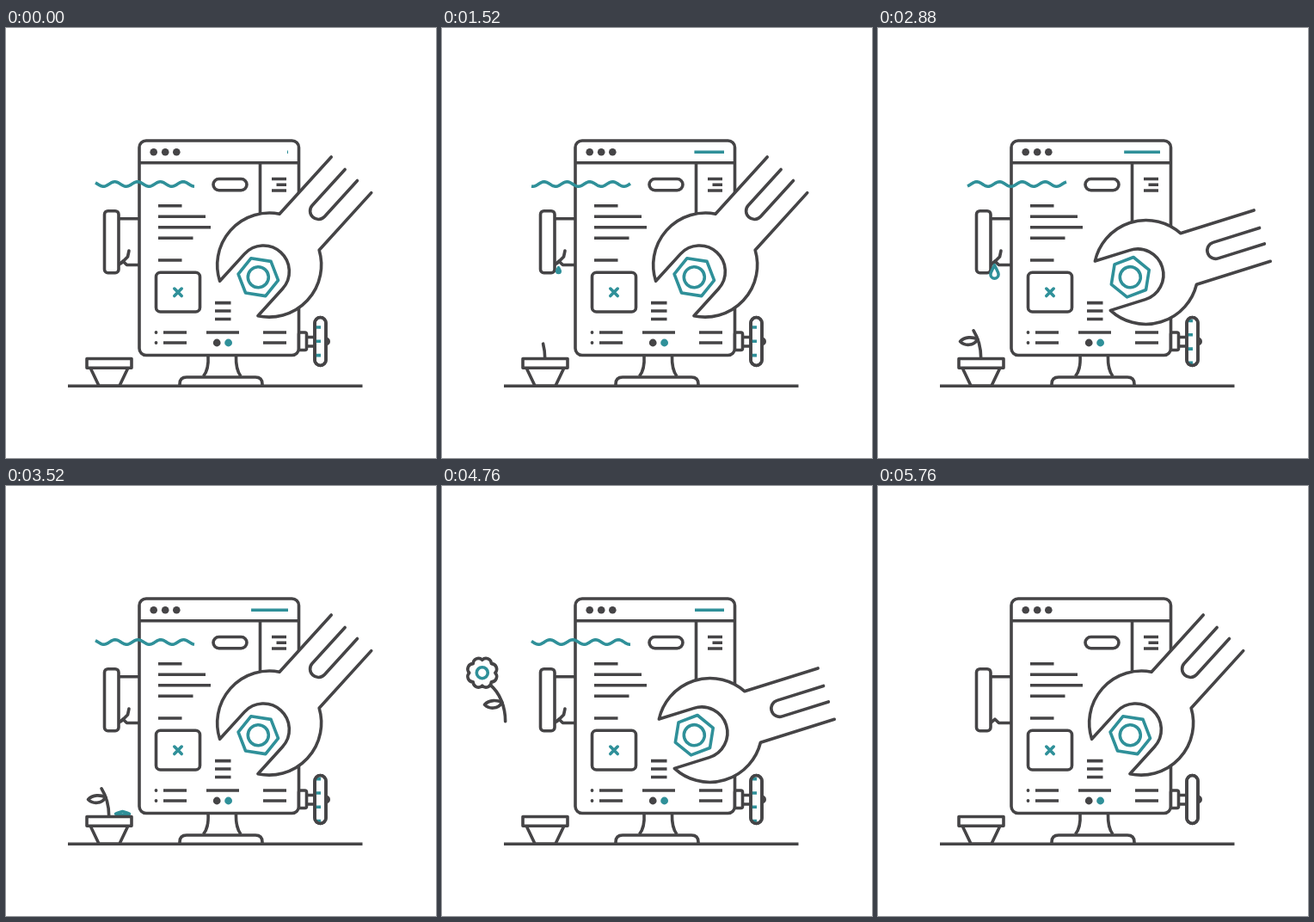
Write an HTML page that moves like this. It is 500 px wide and 500 px high and loops after 5800 ms.

```html
<!DOCTYPE html>
<html lang="en">
<head>
<meta charset="utf-8">
<title>Workshop</title>
<style>
  html, body { margin: 0; width: 100%; height: 100%; overflow: hidden; background: #fff; }
  svg { display: block; width: 100vw; height: 100vh; }
  .ink { fill: none; stroke: #454446; stroke-width: 3.6; stroke-linejoin: round; }
  .teal { stroke: #2f9099; }
  .paper { fill: #fff; }
  .round { stroke-linecap: round; }
  .dot { fill: #454446; stroke: none; }
</style>
</head>
<body>
<svg viewBox="0 0 500 500">
  <defs>
    <clipPath id="rim"><rect x="359" y="336.5" width="13" height="56" rx="6.5"/></clipPath>
  </defs>
  <g class="ink">
    <!-- stand and ground -->
    <path d="M235 381Q236 397 229.500 405M267.500 381Q267 397 273 405"/>
    <path d="M202 416V414Q202 406 210 406H290Q298 406 298 414V416"/>
    <path d="M72 416.300H414.500"/>

    <!-- screen -->
    <rect x="155" y="131" width="185.500" height="249.500" rx="8" class="paper"/>
    <path d="M155 156.700H340.500M295.500 157V245"/>
    <g class="dot">
      <circle cx="171.700" cy="144.300" r="4.300"/>
      <circle cx="185.200" cy="144.300" r="4.300"/>
      <circle cx="198.300" cy="144.300" r="4.300"/>
      <circle cx="174.500" cy="354" r="1.900"/>
      <circle cx="174.500" cy="366" r="1.900"/>
      <circle cx="245.200" cy="366" r="4.400"/>
      <circle cx="258.600" cy="366" r="4.400" fill="#2f9099"/>
    </g>
    <rect x="241" y="175.500" width="39" height="13.200" rx="6.600"/>
    <path d="M309 175.500H326M314.500 182.200H326M309 189H326
      M177 206.800H204.500M177 219.300H232M177 231.700H238M177 244.200H217.500M177 270H204.500
      M243 319.600H261.500M243 329H261.500M243 338.500H261.500
      M183 354H210M183 366H210M233 354H271M299 354H326M299 366H326"/>
    <rect x="174.500" y="284.300" width="51" height="45.700" rx="5"/>
    <path id="cross" class="teal round" d="M-4.200-4.200 4.200 4.200M4.200-4.200-4.200 4.200"/>
    <path id="bar" class="teal"/>

    <!-- leaking pipe -->
    <path d="M131 221.800H155M131 275.500 136 271.200 140.500 275.500H155"/>
    <rect x="114.500" y="212.700" width="16.500" height="72" rx="4" class="paper"/>
    <path id="crack" class="round" d="M143 259 141.500 266 134 273.500"/>
    <path id="wave" class="teal"/>

    <!-- valve -->
    <rect x="340.500" y="354" width="9" height="20.500" rx="2" class="paper"/>
    <path d="M349.500 359.500H359M349.500 370H359"/>
    <circle cx="372" cy="364.500" r="5" class="dot"/>
    <rect x="359" y="336.500" width="13" height="56" rx="6.500" class="paper"/>
    <path id="ticks" class="teal" clip-path="url(#rim)"/>
    <rect x="359" y="336.500" width="13" height="56" rx="6.500"/>

    <!-- plant, drop and pot -->
    <path id="drop" class="teal" stroke-width="3.500" vector-effect="non-scaling-stroke"
      d="M0-16C2-11 4.600-8 4.600-5A4.600 4.600 0 0 1-4.600-5C-4.600-8-2-11 0-16Z"/>
    <g id="plant" class="round">
      <path id="stem" pathLength="1" d="M119.700 384C119.700 368 114 351 101.500 341"/>
      <path id="leaf" pathLength="1" d="M116 362C111 370 101 370 95.500 364.500C101 358.500 110 359 116 362"/>
      <g id="bloom">
        <path id="petals" class="paper"/>
        <circle r="6.500" class="teal"/>
      </g>
    </g>
    <path class="paper" d="M98 395 108 416H132L142 395"/>
    <rect x="94" y="384.500" width="52" height="10.700" class="paper"/>

    <!-- wrench and nut -->
    <g id="wrench" class="round">
      <path class="paper" d="M160.500-31.200H71A60.700 60.700 0 0 0-33.500-30H9A30 30 0 0 1 9 30H-33.500A60.700 60.700 0 0 0 71 31.200H161"/>
      <path d="M160.500-9.700H104A9.700 9.700 0 0 0 104 9.700H160.500"/>
      <path id="nut" class="teal"/>
      <circle r="12" class="teal"/>
    </g>
  </g>
</svg>
<script>
const LOOP = 5800, CYCLE = 1900, GAP = 16.3;
const el = id => document.getElementById(id);
const set = (id, name, value) => el(id).setAttribute(name, value);
const show = (id, on) => set(id, 'visibility', on ? 'visible' : 'hidden');
const ramp = (t, a, b) => Math.min(1, Math.max(0, (t - a) / (b - a)));
const ease = (t, a, b) => (1 - Math.cos(Math.PI * ramp(t, a, b))) / 2;
const polar = (r, deg) => {
  const a = deg * Math.PI / 180;
  return (r * Math.cos(a)).toFixed(2) + ' ' + (r * Math.sin(a)).toFixed(2);
};

set('nut', 'd', 'M' + [0, 1, 2, 3, 4, 5].map(i => polar(23.5, i * 60 - 3.5)).join('L') + 'Z');
let petals = 'M' + polar(15, 0);
for (let i = 1; i <= 8; i++) petals += 'A6.2 6.2 0 0 1 ' + polar(15, i * 45);
set('petals', 'd', petals + 'Z');

function drawWave(t) {
  let d = '';
  for (let x = 104; x <= 219; x++) {
    const y = 181.5 - 2.7 * Math.cos(2 * Math.PI * ((x - 100) / 26.5 + t / 1180));
    d += (d ? 'L' : 'M') + x + ' ' + y.toFixed(2);
  }
  set('wave', 'd', d);
}

// Two swings per cycle, each with a short hold at the far end
function drawWrench(local) {
  const swing = s => ease(local, s, s + 275) - ease(local, s + 365, s + 640);
  const angle = -47.7 + 30.3 * (swing(0) + swing(655));
  set('wrench', 'transform', `translate(293.300 289.700) rotate(${angle})`);
}

function drawTicks(local, cycle) {
  const start = [0, 0, -1.5][cycle], turn = [1, 1.45, 0.95][cycle];
  const shift = start - turn * ease(local, 0, 360) - ease(local, 960, 1300);
  const first = 348 + ((shift % 1) - 1) * GAP;
  let d = '';
  for (let k = 0; k < 6; k++) d += `M359 ${first + k * GAP}H366`;
  set('ticks', 'd', d);
}

function drawBar(t) {
  const x = t < 3750 ? 1 - t / 3750 : ramp(t, 3750, 5400);
  const width = 43 * Math.sqrt(1 - x * x);
  set('bar', 'd', `M${328 - width} 144.200H328`);
}

// Three drops: swell, fall, flatten on the soil
function drawDrop(t) {
  const local = t % 1220;
  show('drop', t < 3660 && local > 240 && local < 1165);
  const size = 0.1 + 0.9 * ramp(local, 240, 430);
  const fall = Math.max(0, Math.min(local, 830) - 430) / 400;
  const flat = ramp(local, 830, 1165);
  const y = 282 + 11 * size + 91 * fall * fall;
  set('drop', 'transform',
    `translate(135.500 ${y - 1.5}) scale(${size * (1 + flat)} ${size * (1 - flat)})`);
}

function drawPart(id, amount) {
  show(id, amount > 0);
  set(id, 'stroke-dasharray', amount + ' 2');
}

function drawPlant(t) {
  const p = ease(t, 4200, 5400), q = 2 * p * (1 - p);
  set('plant', 'transform', `translate(${-102 * q + 22 * p * p} ${-112 * q - 272 * p * p})`);
  drawPart('stem', 0.7 * ease(t, 1250, 1790) + 0.3 * ease(t, 3600, 3850));
  drawPart('leaf', ease(t, 1900, 2660));
  const bloom = ease(t, 3780, 4160);
  show('bloom', bloom > 0);
  set('bloom', 'transform', `translate(92.800 327.500) scale(${bloom})`);
}

function draw(t) {
  const cycle = Math.min(2, Math.floor(t / CYCLE)), local = t - cycle * CYCLE;
  const live = t < 5760;
  drawWave(t);
  drawWrench(local);
  drawTicks(local, cycle);
  drawBar(t);
  drawDrop(t);
  drawPlant(t);
  set('cross', 'transform', `translate(200 307.300) rotate(${90 * ease(local, 527, 927)})`);
  show('bar', t > 0 && t < 5400);
  for (const id of ['wave', 'ticks', 'crack']) show(id, live);
  el('plant').style.display = live ? '' : 'none';
}

const begin = performance.now();
function tick() {
  draw((performance.now() - begin) % LOOP);
  requestAnimationFrame(tick);
}
draw(0);
requestAnimationFrame(tick);
</script>
</body>
</html>
```
